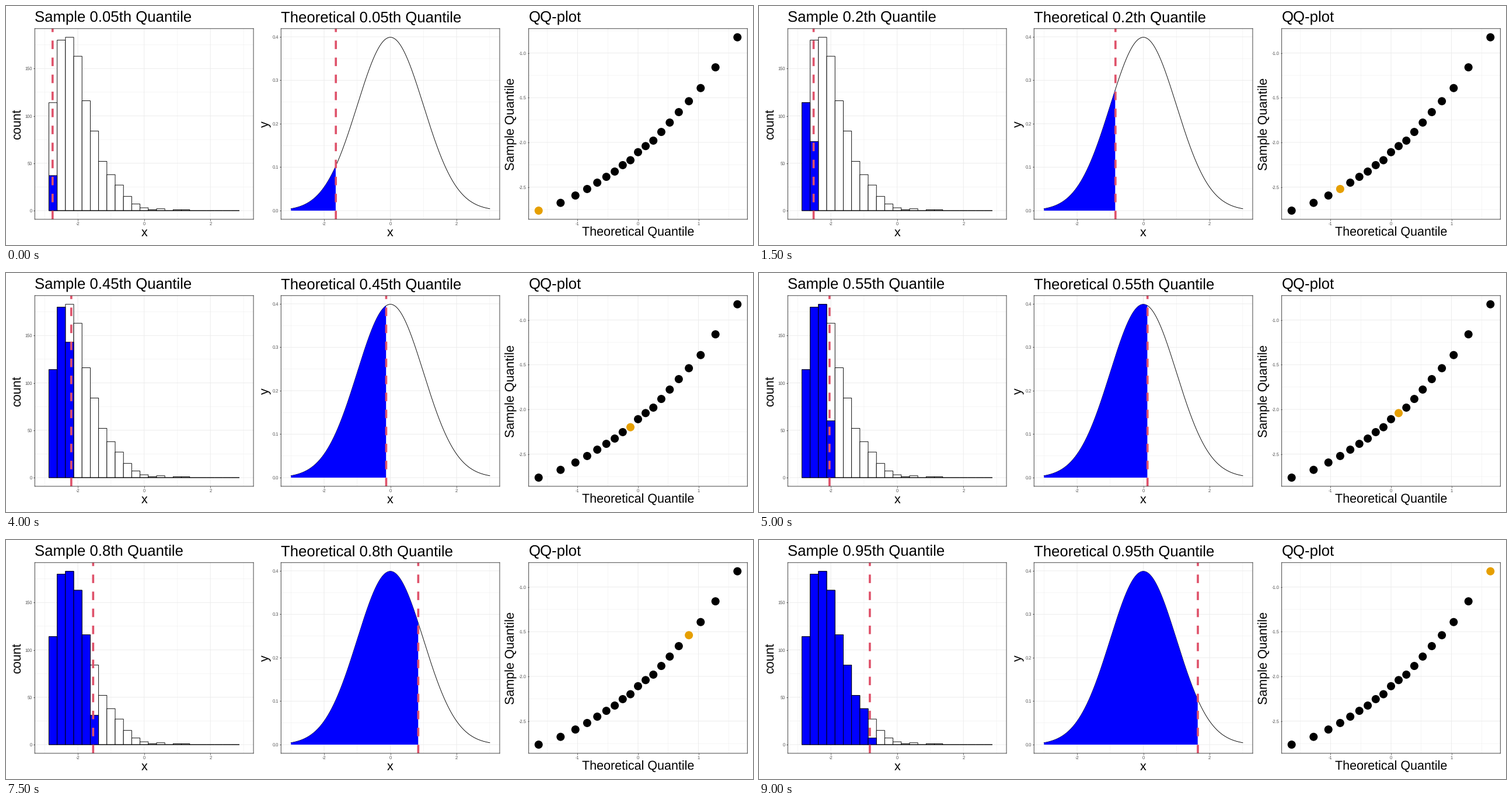
A matplotlib script that plays this animation: 1280x410 px, repeating every 9500 ms.

```python
import math
import numpy as np
import matplotlib.pyplot as plt
from matplotlib.animation import FuncAnimation

W, H, DPI = 1280, 410, 80
PX = 72 / DPI                      # points per pixel
LINE = 0.91 * PX
TOP, BOTTOM, PANEL_W = 38.8, 365.9, 374.7
BLUE, RED, ORANGE = "#0000ff", "#df536b", "#e69f00"

plt.rcParams.update({
    "font.family": "Liberation Sans",
    "axes.unicode_minus": False,
    "axes.axisbelow": True,
    "path.snap": False,
    "text.hinting": "none",
})

# Sample: counts per bin of width 0.25, and its quantiles at 0.05 ... 0.95
SIZE, OUTSIDE, BIN = 1000, 13, 0.25
counts = np.zeros(23)
counts[:17] = [114, 180, 183, 163, 116, 84, 52, 38, 27, 15, 7, 3, 1, 2, 0, 1, 1]
below = np.concatenate(([0], np.cumsum(counts)[:-1]))
edges = -2.875 + BIN * np.arange(23)

probs = np.arange(1, 20) / 20
sample_q = np.array([
    -2.763, -2.676, -2.594, -2.521, -2.450, -2.385, -2.326, -2.254, -2.199, -2.109,
    -2.041, -1.980, -1.883, -1.778, -1.661, -1.539, -1.392, -1.160, -0.824])


def density(x):
    return np.exp(-x * x / 2) / math.sqrt(2 * math.pi)


grid = np.linspace(-3, 3, 601)
cdf = [0.5 * (1 + math.erf(x / math.sqrt(2))) for x in grid]
normal_q = np.interp(probs, cdf, grid)

fig = plt.figure(figsize=(W / DPI, H / DPI), dpi=DPI, facecolor="white")


def label(x, y, text, size, **kw):
    return fig.text(x / W, 1 - y / H, text, fontsize=size * PX, color="black",
                    va="baseline", **kw)


def panel(center, title, xlab, ylab, ylab_x, xlim, ylim, xticks, yticks, yfmt):
    """Bordered plot with grid; ticks are (major, minor) pairs."""
    left = center - PANEL_W / 2
    ax = fig.add_axes([left / W, 1 - BOTTOM / H, PANEL_W / W, (BOTTOM - TOP) / H])
    ax.set_xlim(xlim)
    ax.set_ylim(ylim)
    for axis, (major, minor), fmt in ((ax.xaxis, xticks, "{x:.0f}"),
                                      (ax.yaxis, yticks, yfmt)):
        axis.set_ticks(major)
        axis.set_ticks(minor, minor=True)
        axis.set_major_formatter(fmt)
    ax.tick_params(which="major", length=2.4 * PX, width=LINE, pad=1.9 * PX,
                   color="#333333", labelcolor="#4d4d4d", labelsize=7.55 * PX)
    ax.tick_params(which="minor", length=0)
    ax.grid(which="major", color="#ebebeb", lw=LINE)
    ax.grid(which="minor", color="#ebebeb", lw=LINE / 2)
    for spine in ax.spines.values():
        spine.set(color="#333333", linewidth=LINE)
    label(center, 395.3, xlab, 21.5, ha="center")
    fig.text(ylab_x / W, 1 - (TOP + BOTTOM) / 2 / H, ylab, fontsize=21.5 * PX,
             rotation=90, rotation_mode="anchor", ha="center", va="baseline")
    return ax, label(left, 28, title, 25.8, ha="left")


def padded(lo, hi):
    pad = 0.05 * (hi - lo)
    return lo - pad, hi + pad


def marker_line(ax):
    return ax.axvline(0, color=RED, lw=3.65 * PX, ls=(0, (4, 4)), zorder=2.4)


wide = ([-2, 0, 2], [-3, -1, 1, 3])
hist_ax, hist_title = panel(
    236.7, "", "x", "count", 25.3, padded(-3, 3), padded(0, counts.max()),
    wide, (np.arange(0, 151, 50), np.arange(25, 176, 50)), "{x:.0f}")
norm_ax, norm_title = panel(
    658.6, "", "x", "y", 450, padded(-3, 3), padded(0, density(0)),
    wide, (np.arange(5) / 10, np.arange(4) / 10 + 0.05), "{x:.1f}")
qq_ax, _ = panel(
    1083, "QQ-plot", "Theoretical Quantile", "Sample Quantile", 871.5,
    padded(normal_q[0], normal_q[-1]), padded(sample_q[0], sample_q[-1]),
    ([-1, 0, 1], [-1.5, -0.5, 0.5, 1.5]),
    (np.arange(-2.5, -0.9, 0.5), np.arange(-2.75, -0.7, 0.5)), "{x:.1f}")

bar_style = dict(width=BIN, align="edge", ec="black", lw=LINE)
hist_ax.bar(edges, counts, fc="white", **bar_style)
filled = hist_ax.bar(edges, counts, fc=BLUE, **bar_style)
hist_line = marker_line(hist_ax)

norm_ax.plot(grid, density(grid), color="black", lw=LINE)
area, = norm_ax.fill([0, 0, 0], [0, 0, 0], fc=BLUE, lw=0, zorder=2.1)
norm_line = marker_line(norm_ax)

dots = qq_ax.scatter(normal_q, sample_q, s=(14 * PX) ** 2, linewidths=0, zorder=2.2)


def update(i):
    p = probs[i]
    hist_title.set_text(f"Sample {p:g}th Quantile")
    norm_title.set_text(f"Theoretical {p:g}th Quantile")

    total = round(SIZE * p) - OUTSIDE
    for bar, h in zip(filled, np.clip(total - below, 0, counts)):
        bar.set_height(h)
    hist_line.set_xdata([sample_q[i]] * 2)

    x = grid[grid <= normal_q[i]]
    area.set_xy(np.column_stack((np.r_[x[0], x, x[-1]], np.r_[0, density(x), 0])))
    norm_line.set_xdata([normal_q[i]] * 2)

    dots.set_facecolor([ORANGE if k == i else "black" for k in range(len(probs))])
    return [hist_title, norm_title, *filled, hist_line, area, norm_line, dots]


anim = FuncAnimation(fig, update, frames=len(probs), interval=500,
                     repeat=True, repeat_delay=0, blit=False)
plt.show()
```
